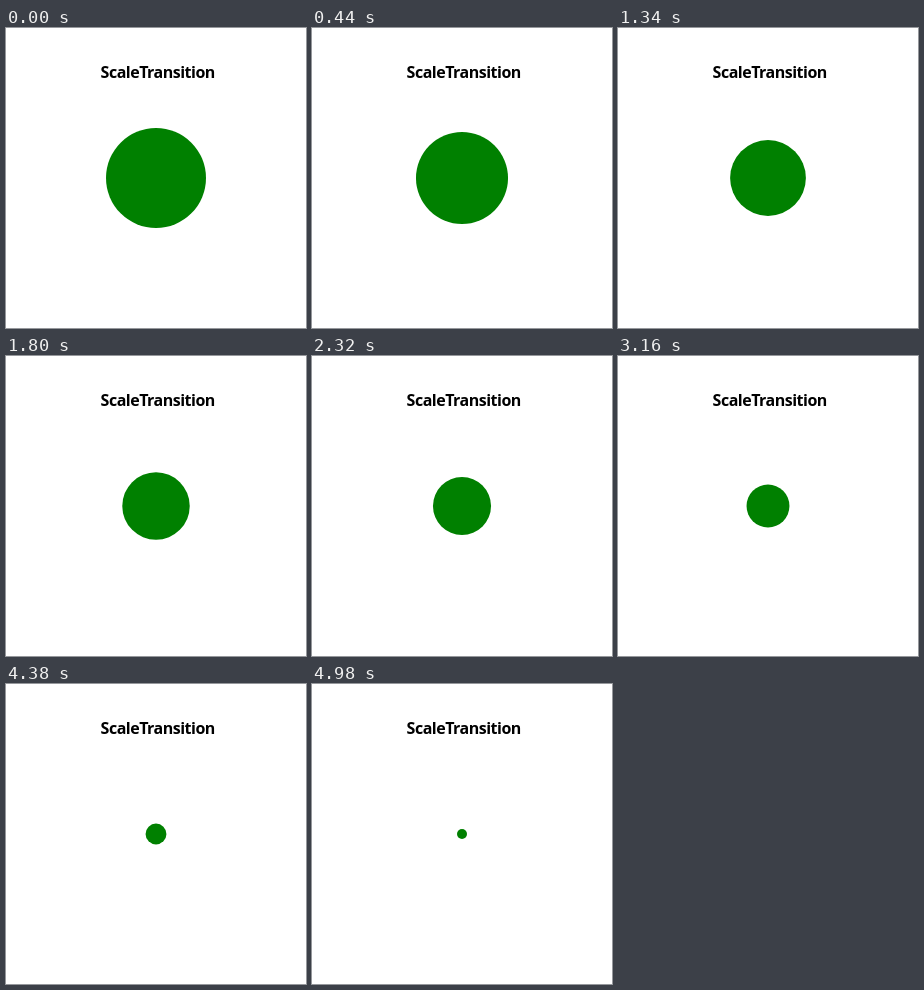
These frames come from a looping animation (300 px wide and 300 px high, 6 s). An HTML page with a canvas:

```html
<!DOCTYPE html>
<html lang="en">
<head>
<meta charset="utf-8">
<title>ScaleTransition</title>
<style>
  html, body { margin: 0; width: 100%; height: 100%; overflow: hidden; background: #fff; }
  canvas { display: block; }
</style>
</head>
<body>
<canvas id="stage" width="300" height="300"></canvas>
<script>
  const ctx = document.getElementById("stage").getContext("2d");
  const LOOP = 6000, SHRINK = 4980, STEP = 20;
  const FROM = 50, TO = 5;

  function draw(ms) {
    const t = Math.floor(ms / STEP) * STEP;
    const radius = FROM + (TO - FROM) * Math.min(t / SHRINK, 1);

    ctx.fillStyle = "#fff";
    ctx.fillRect(0, 0, 300, 300);

    ctx.fillStyle = "#000";
    ctx.font = "bold 16px 'Open Sans', 'Noto Sans', sans-serif";
    ctx.letterSpacing = "-0.5px";
    ctx.fillText("ScaleTransition", 94.6, 50);

    ctx.fillStyle = "#008000";
    ctx.beginPath();
    ctx.arc(150, 150, radius, 0, Math.PI * 2);
    ctx.fill();
  }

  const start = performance.now();
  function tick() {
    draw((performance.now() - start) % LOOP);
    requestAnimationFrame(tick);
  }
  tick();
</script>
</body>
</html>
```
